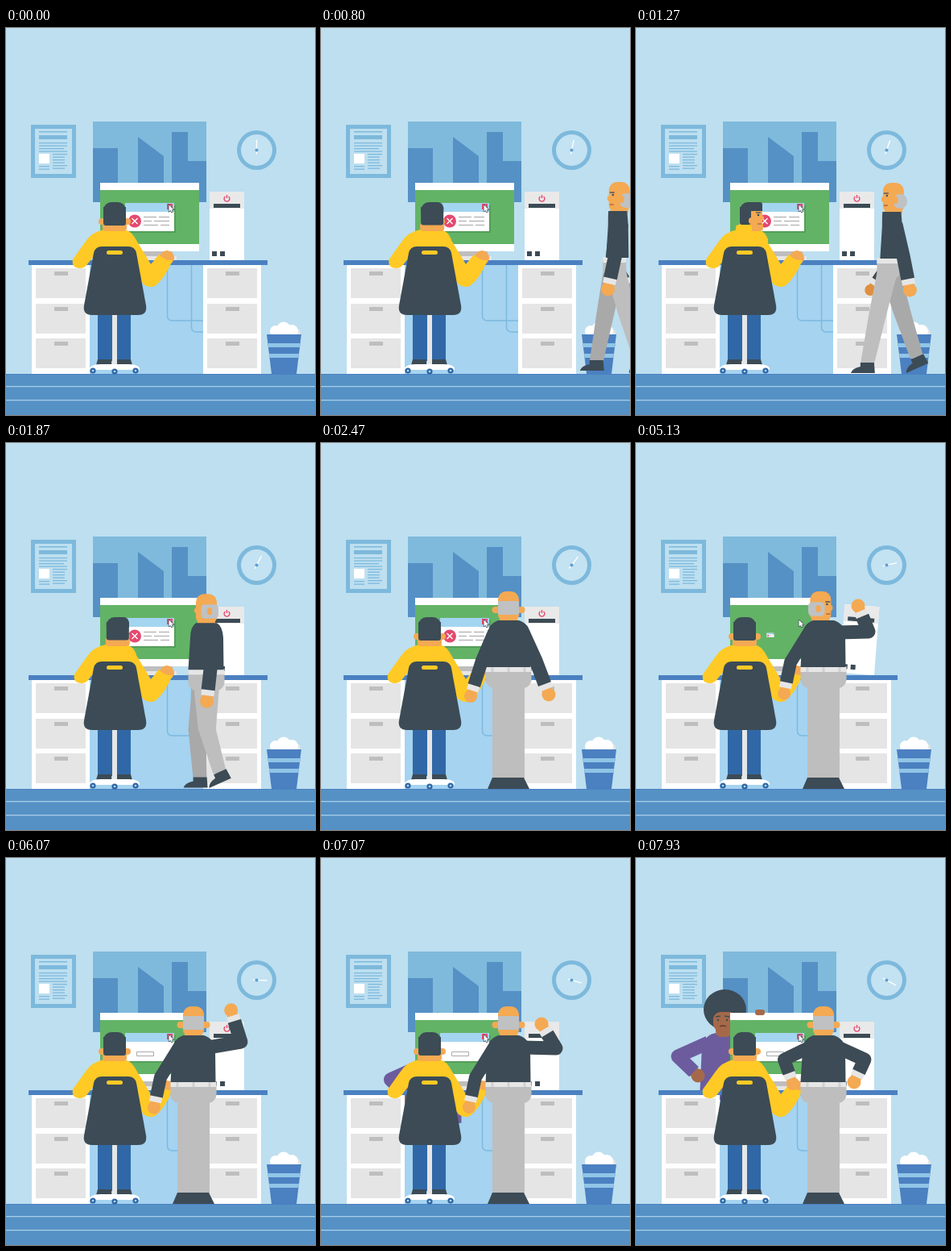
An HTML page with a canvas for the animation above (8000 ms loop, 384x480 px).

```html
<!DOCTYPE html>
<html lang="en">
<head>
<meta charset="utf-8">
<title>Office computer trouble</title>
<style>
html, body { margin: 0; width: 100%; height: 100%; overflow: hidden; background: #bddff0; }
canvas { display: block; width: 100%; height: 100%; }
</style>
</head>
<body>
<canvas id="stage"></canvas>
<script>
const canvas = document.getElementById('stage');
const ctx = canvas.getContext('2d');
const ratio = window.devicePixelRatio || 1;
canvas.width = 384 * ratio;
canvas.height = 480 * ratio;

const LOOP = 8000;
const WALL = '#bddff0', SKY = '#7db9dc', BLUE = '#5591c5', DESK = '#4b80c1', DENIM = '#3068a7';
const DARK = '#3c4b55', GREY = '#bebebe', PALE = '#e6e6e6', WHITE = '#fff';
const YELLOW = '#ffca25', SKIN = '#f4a953', BROWN = '#a5694a', PURPLE = '#6c5c9e', RED = '#e4496f';

// Drawing helpers
function box(color, x, y, w, h, r = 0) {
  ctx.fillStyle = color;
  ctx.beginPath();
  ctx.roundRect(x, y, w, h, r);
  ctx.fill();
}
function fill(color, path) {
  ctx.fillStyle = color;
  ctx.fill(new Path2D(path));
}
function stroke(color, width, path) {
  ctx.strokeStyle = color;
  ctx.lineWidth = width;
  ctx.stroke(new Path2D(path));
}
function oval(color, x, y, rx, ry = rx) {
  ctx.fillStyle = color;
  ctx.beginPath();
  ctx.ellipse(x, y, rx, ry, 0, 0, Math.PI * 2);
  ctx.fill();
}
function at(x, y, draw, angle = 0, sx = 1, sy = sx) {
  ctx.save();
  ctx.translate(x, y);
  ctx.rotate(angle);
  ctx.scale(sx, sy);
  draw();
  ctx.restore();
}

// Timing helpers
const clamp = v => Math.max(0, Math.min(1, v));
const smooth = u => u * u * (3 - 2 * u);
const mix = (a, b, u) => Array.isArray(a) ? a.map((v, i) => mix(v, b[i], u)) : a + (b - a) * u;
function key(t, ...stops) {
  const next = stops.findIndex(s => s[0] > t);
  if (next < 0) return stops[stops.length - 1][1];
  if (next === 0) return stops[0][1];
  const [t0, a] = stops[next - 1], [t1, b] = stops[next];
  return mix(a, b, smooth((t - t0) / (t1 - t0)));
}

function arm(color, skin, cuff, shoulder, elbow, hand, width) {
  const dx = elbow[0] - hand[0], dy = elbow[1] - hand[1], len = Math.hypot(dx, dy);
  const toward = d => [hand[0] + dx / len * d, hand[1] + dy / len * d];
  ctx.lineJoin = 'round';
  oval(skin, ...hand, width / 2);
  stroke(skin, width - 4, `M${hand} L${toward(8)}`);
  if (cuff) stroke(cuff, width - 1, `M${toward(7)} L${toward(15)}`);
  stroke(color, width, `M${shoulder} L${elbow} L${toward(cuff ? 14 : 7)}`);
}

function room(t) {
  box(WALL, 0, 0, 384, 480);
  box('#a5d3f0', 104, 294, 141, 135);

  box(SKY, 31, 120, 56, 66);
  box(WALL, 36, 125, 46, 56);
  box(SKY, 41, 128, 35, 1.5);
  box(SKY, 41, 133, 35, 5);
  for (let y = 142; y < 154; y += 3.5) box(SKY, 41, y, y > 148 && y < 151 ? 31 : 35, 1.3);
  box(WHITE, 41, 156, 13, 12);
  for (let y = 156; y < 176; y += 3.5) box(SKY, 58, y, y % 2 ? 15 : 18, 1.3);
  box(SKY, 41, 171, 13, 1.3);
  box(SKY, 41, 174.5, 13, 1.3);

  box('#7fbadc', 108, 116, 141, 100);
  fill(BLUE, 'M108 149H139V192H164V135L196 159V192H206V129H226V165H249V216H108Z');

  oval(SKY, 311.5, 151.5, 24.5);
  oval('#c3e2f2', 311.5, 151.5, 19.5);
  at(311.5, 151.5, () => {
    stroke(WHITE, 1.4, 'M0 5V-13');
  }, t * 15 / 1000 * Math.PI / 180);
  oval('#5c9fd2', 311.5, 151.5, 2);

  box(BLUE, 0, 429, 384, 51);
  box(DESK, 0, 429, 384, 1);
  box('#a9cee8', 0, 444, 384, 1.2);
  box('#a9cee8', 0, 461, 384, 1.2);
}

function woman(t) {
  const reach = key(t, [6800, 2], [7400, -0.08], [7750, 0]);
  at(31 * reach, 26 * reach, () => {
    oval(DARK, 110.5, 188, 26.5, 25);
    fill(PURPLE, 'M82 232Q88 218 100 217H140V300H79Z');
    box(BROWN, 99, 205, 20, 17, 7);
    box(BROWN, 96, 191, 29, 24, 9);
    stroke(DARK, 1.6, 'M99 197L105 196M110 196L116 197');
    oval(DARK, 102, 201, 1.2);
    oval(DARK, 113, 201, 1.2);
    stroke('#5e3b35', 1.3, 'M104 209Q108 207 112 209');
    arm(PURPLE, BROWN, null, [90, 229], [52, 246], [77, 270], 17);
  });
}

function popup(t) {
  const size = key(t, [4930, 1], [5130, 0.15], [5200, 0.15], [5400, 1]);
  at(165, 239, () => {
    ctx.translate(-165, -239);
    box('#3d7d4a66', 150, 220, 61, 34);
    box(WHITE, 148, 217, 61, 35);
    box('#a3d5f1', 148, 217, 61, 11);
    box(RED, 200, 218, 7, 7);
    stroke(WHITE, 1, 'M202 220l3 3m0 -3l-3 3');
    if (t < 5140) {
      oval(RED, 160, 239.5, 8);
      stroke(WHITE, 1.4, 'M156.5 236l7 7m0 -7l-7 7');
      stroke('#b9b9b9', 1.5, 'M171 234.5h16m3 0h13M171 239.5h10m3 0h19M171 244.5h18m3 0h11');
    } else {
      stroke('#aaa', 1, 'M162.5 240.5h21v5h-21z');
    }
  }, 0, size);
  const cursor = 'M202.5 219.5v8l2 -1.6l1.3 2.4l1.3 -.7l-1.3 -2.4h2.5Z';
  stroke(DARK, 1.4, cursor);
  fill(WHITE, cursor);
}

function computer(t) {
  const tilt = key(t, [4930, 0], [5080, 0.08], [5150, 0.075], [5350, 0],
    [5750, 0], [5850, 0.07], [6050, 0], [6450, 0], [6550, 0.07], [6750, 0]);
  at(296, 288, () => {
    box(WHITE, -43, -85, 43, 85);
    box('#e9e9e9', -43, -85, 43, 21);
    box(DARK, -38, -70, 33, 5);
    stroke(RED, 1.4, 'M-23.5 -79a3.4 3.4 0 1 0 4 0M-21.5 -81v4');
    box(DARK, -40, -11, 6, 6);
    box(DARK, -30, -11, 6, 6);
  }, tilt);
}

function desk(t) {
  box(GREY, 150, 276, 57, 7);
  box(PALE, 145, 283, 67, 5);
  box(WHITE, 117, 192, 123, 85);
  box('#63b366', 117, 201, 123, 67);
  popup(t);
  if (t > 7250) {
    const drop = key(t, [7250, 6], [7450, 0]);
    ctx.save();
    ctx.beginPath();
    ctx.rect(140, 180, 30, 15);
    ctx.clip();
    box(BROWN, 148, 188 + drop, 12, 7, 3);
    ctx.restore();
  }
  computer(t);

  stroke('#7db9df', 1.4, 'M200.5 294V357Q200.5 363 207 363H246M230.5 294V371Q230.5 377 237 377H246');
  for (const x of [32, 245]) {
    box(WHITE, x, 294, 72, 135);
    for (const y of [298, 342, 385]) {
      box('#e5e5e5', x + 5, y, 62, 37);
      box(GREY, x + 28, y + 4, 17, 5);
    }
  }
  box(DESK, 28, 288, 297, 6);

  oval(PALE, 361, 378, 5);
  for (const [x, y, r] of [[335, 376, 7], [345, 373, 8.5], [355, 376, 8]]) oval(WHITE, x, y, r);
  fill(DESK, 'M324 380H367L361 429H330Z');
  fill('#91c5e7', 'M325.4 391H365.6L365 396H326ZM327 404H364L363.4 409H327.6Z');
}

function boy(t) {
  const turn = key(t, [650, 0], [1000, 1], [1650, 1], [2080, 0]);
  oval(SKIN, 200, 285, 9);
  fill(SKIN, 'M188 284L200 276L208 287L202 294Z');
  fill(YELLOW, 'M146 250Q157 252 163 265L180 293L190 281Q197 289 207 288Q197 311 185 320Q178 323 171 318L150 290Z');
  at(4 * turn, 0, () => fill(YELLOW,
    'M122 250Q106 253 98 266L83 287Q81 297 91 298Q98 298 101 293L113 278H160V262Q156 251 146 250Z'));

  at(135 + 8 * turn, 0, () => {
    box(SKIN, -15, 241, 30, 11, 4);
    if (turn > 0.7) {
      box(SKIN, -13, 222, 27, 28, 5);
      box(YELLOW, -19, 244, 20, 10, 4);
    }
    if (turn < 0.3) box(SKIN, -20, 236, 12, 8, 4);
    if (turn < 0.6) box(SKIN, 8 - 2 * turn, 236, 12 - 8 * turn, 8, 4);
    const back = 28 - 14 * clamp(2 * turn - 1);
    box(DARK, -14, 216, 28, 15 - 4 * turn, [10, 10 - 7 * turn, 0, 0]);
    box(DARK, -14, 222, back, 23 - turn, [0, 0, 3, 3]);
    if (turn >= 0.6) box(SKIN, 12 - 15 * turn, 235, 7, 8, 4);
    if (turn > 0.7) {
      oval(DARK, 9, 232, 1.3);
      stroke(DARK, 1.2, 'M6 229h6');
      stroke('#b45b3c', 1.2, 'M8 243h5');
      box(SKIN, 11, 233, 5, 5, 2);
    }
  });

  box(DENIM, 114, 350, 41, 63);
  fill(DARK, 'M114 411H131V418H112ZM138 411H155L157 418H138Z');
  box(PALE, 132, 350, 6, 70);
  fill(WHITE, 'M104 422Q106 417 118 417H152Q164 417 166 422V424H104Z');
  for (const [x, y] of [[108, 425], [135, 426], [161, 425]]) {
    oval(DENIM, x, y, 3.6);
    oval('#b9d8ed', x, y, 1.3);
  }
  fill(DARK, 'M119 271H152Q160 271 162 279L174 344Q176 356 164 356H107Q95 356 97 344L109 279Q111 271 119 271Z');
  box(YELLOW, 125, 276, 20, 5, 2.5);
}

// face: 1 looks left, 0 looks at the wall, -1 looks right
function manHead(x, y, face) {
  const q = Math.abs(face);
  at(x, y, () => {
    box(SKIN, -11, 18, 22, 22, 4);
    box(SKIN, -13, 0, 26, 36, [10, 10, 7, 7]);
    if (q < 0.3) {
      box(SKIN, -20.5, 19, 12, 8, 4);
      box(SKIN, 8.5, 19, 12, 8, 4);
    } else {
      box(SKIN, -15, 17, 7, 7, 3);
    }
    box('#bfc1c3', -13 + 13 * q, 12 + 2 * q, 26 - 9 * q, 17 + q, 1 + 7 * q);
    if (q >= 0.3) box(SKIN, 14 - 26 * Math.min(q, 0.55), 17, 6, 9, 3);
    if (q > 0.55) {
      oval(DARK, -8, 16, 1.2);
      stroke(DARK, 1.3, 'M-12 13h6');
      stroke('#a8553c', 1.2, 'M-12 28h5');
    }
  }, 0, face < 0 ? -1 : 1, 1);
}

function sideLeg(color, x, hipY, hip, off, bend, lift) {
  const rear = clamp(off / 12);
  const footX = x + 4 + off, footY = 415 - 7 * rear - lift;
  const kneeX = (x + footX) / 2 - bend, kneeY = 355;
  fill(color, `M${x - hip} ${hipY}H${x + hip}L${kneeX + 11} ${kneeY}L${footX + 9} ${footY + 2}`
    + `H${footX - 8}L${kneeX - 11} ${kneeY}Z`);
  at(footX, footY, () => fill(DARK, 'M-8 0H9L10 13H-20Q-18 7 -8 5Z'), -0.42 * rear);
}

function man(t) {
  const x = t < 1870 ? 249 + (1870 - t) * 0.1083 : key(t, [1870, 249], [2180, 233]);
  if (x > 445) return;
  const stride = key(t, [1650, 31], [1900, 12], [2180, 0]);
  const phase = Math.PI * (t - 1270) / 560;
  const near = -stride * Math.cos(phase);
  const lift = stride / 5 * Math.sin(phase);
  const dip = Math.abs(near) * 0.26;
  const half = key(t, [1550, 14.5], [1870, 22.5], [2250, 28.5]);
  const face = key(t, [1600, 1], [1870, 0.5], [2200, 0], [4500, 0], [4800, -0.6], [5300, -0.6], [5600, 0]);
  const walking = t < 2080;
  const swing = y => y + dip;

  if (walking) {
    if (t < 1750) arm(DARK, '#e08f3e', PALE, [x, swing(244)], [x - near * 0.15, swing(278)], [x + near * 0.73, swing(317)], 14);
    const bend = (31 - stride) * 0.4, hip = Math.max(13, half * 0.75);
    sideLeg('#a9a9a9', x, 288 + dip, hip, -near, bend, Math.max(0, -lift));
    sideLeg(GREY, x, 288 + dip, hip, near, bend, Math.max(0, lift));
  } else {
    box(GREY, x - 20, 284, 40, 132);
    fill(DARK, `M${x - 20} 415H${x + 19}L${x + 26} 429H${x - 26}Z`);
  }

  at(x, dip, () => {
    box(GREY, -half, 281, half * 2, 23, [0, 0, 11, 11]);
    box(PALE, -half, 277, half * 2, 7);
    if (half > 25) for (const loop of [-20, 0, 20]) box('#d1d1d1', loop - 1.5, 277, 3, 7);
  });

  if (!walking) {
    const down = clamp((t - 2080) / 100);
    const elbowL = key(t, [3500, [200, 270]], [4300, [192, 272]], [7150, [192, 272]], [7600, [184, 250]]);
    const handL = key(t, [3500, [186, 314]], [4300, [184, 311]], [7150, [184, 309]], [7600, [195, 280]]);
    const bang = [[289, 234], [276, 202]], up = [[293, 226], [281, 184]];
    const pose = i => key(t, [3700, [[267, 270], [283, 312]][i]], [4400, bang[i]], [4800, up[i]], [5050, bang[i]],
      [5200, bang[i]], [5550, up[i]], [5820, bang[i]], [6200, up[i]], [6520, bang[i]],
      [7070, [[292, 236], [274, 206]][i]], [7250, [[293, 237], [276, 212]][i]],
      [7650, [[284, 250], [271, 278]][i]]);
    const place = ([px, py], side) => [mix(x + side * 16, px + x - 233, down), py];
    arm(DARK, SKIN, PALE, [x - 18, 235], place(elbowL, -1), place(handL, -1), 16);
    arm(DARK, SKIN, PALE, [x + 18, 235], place(pose(0), 1), place(pose(1), 1), 17);
  }

  const headShift = face < 0 ? 6 * face : 12 * Math.max(0, face - 0.5);
  manHead(x + headShift, 184 + dip, face);
  const neck = Math.min(13, half * 0.8), shoulder = half - 2.5;
  at(x + 8 * Math.max(0, face - 0.5), dip, () => fill(DARK,
    `M${-neck} 220H${neck}Q${shoulder} 224 ${shoulder + 1} 238L${half - 1} 278H${-half}L${-shoulder} 238Q${-shoulder} 225 ${-neck} 220Z`));

  if (walking) {
    const handX = x + 8 - near * 0.6;
    arm(DARK, SKIN, PALE, [x + 9, swing(235)], [x + 9 - near * 0.3, swing(275)], [handX, swing(317)], 17);
  }
}

function frame() {
  const t = performance.now() % LOOP;
  ctx.setTransform(ratio, 0, 0, ratio, 0, 0);
  room(t);
  if (t > 6800) woman(t);
  desk(t);
  boy(t);
  man(t);
  requestAnimationFrame(frame);
}
frame();
</script>
</body>
</html>
```
